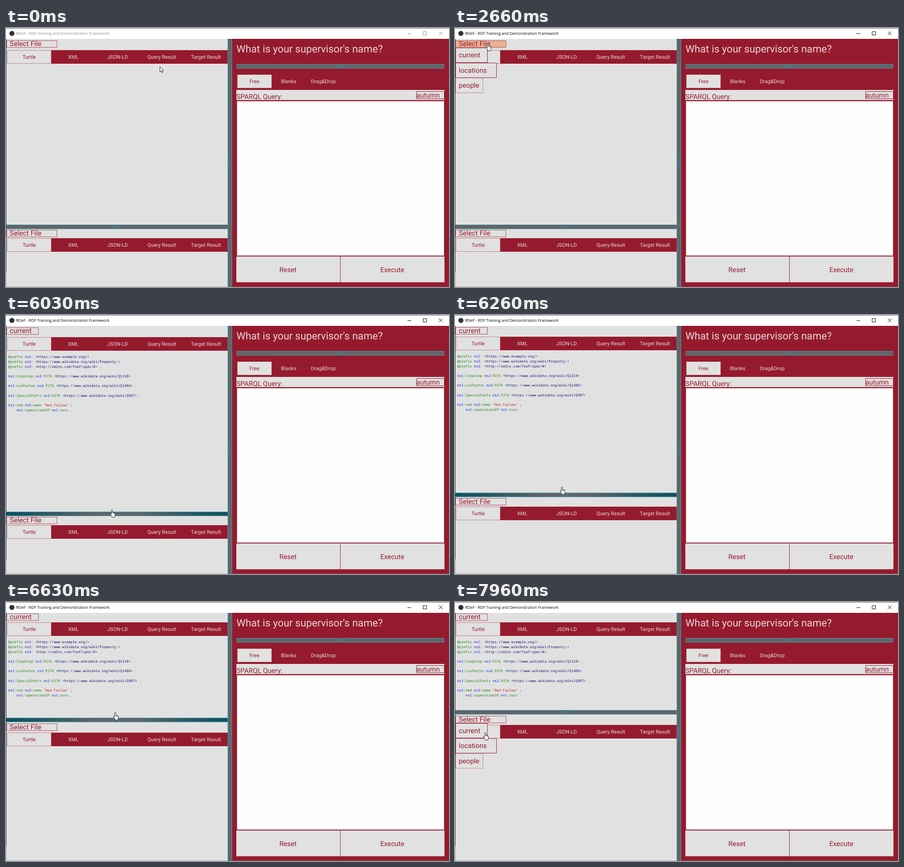
These frames come from a looping animation (977 px wide and 573 px high, 8 s). An HTML page:

```html
<!DOCTYPE html>
<html lang="en">
<head>
<meta charset="utf-8">
<title>RDeF</title>
<style>
html, body { margin: 0; width: 100%; height: 100%; overflow: hidden; background: #fff; }
svg { display: block; width: 977px; height: 573px; }
text { font-family: Roboto, sans-serif; text-rendering: geometricPrecision; white-space: pre; }
.bar { font-family: "Open Sans", sans-serif; }
.code { font-family: "Noto Sans Mono", "DejaVu Sans Mono", monospace; }
</style>
</head>
<body>
<svg id="stage" viewBox="0 0 977 573" xmlns="http://www.w3.org/2000/svg">
  <defs>
    <linearGradient id="teal">
      <stop offset="0" stop-color="#0d525b"/><stop offset=".1" stop-color="#1c555c"/>
      <stop offset=".4" stop-color="#636464"/><stop offset=".6" stop-color="#636464"/>
      <stop offset=".9" stop-color="#1c555c"/><stop offset="1" stop-color="#0d525b"/>
    </linearGradient>
  </defs>
</svg>
<script>
const LOOP = 8000;
const RED = '#961a2d', GRAY = '#e1e1e1', PEACH = '#ebb292', PALE = '#e4d8da';
const STEEL = '#636464', BLUE = '#3b93b1';
const TABS = ['Turtle', 'XML', 'JSON-LD', 'Query Result', 'Target Result'];
const CODE = `@prefix ns1: <https://www.example.org/> .
@prefix ns2: <https://www.wikidata.org/wiki/Property:> .
@prefix ns3: <http://xmlns.com/foaf/spec/#> .

ns1:CorpCorp ns2:P276 <https://www.wikidata.org/wiki/Q1218> .

ns1:LosPartos ns2:P276 <https://www.wikidata.org/wiki/Q1486> .

ns1:SpecialParts ns2:P276 <https://www.wikidata.org/wiki/Q987> .

ns1:ned ns3:name "Ned Farlow" ;
    ns1:superviserOf ns1:ross .`;

const stage = document.getElementById('stage');

function el(parent, tag, attrs = {}, text) {
  const node = document.createElementNS('http://www.w3.org/2000/svg', tag);
  set(node, attrs);
  if (text !== undefined) node.textContent = text;
  return parent.appendChild(node);
}
function set(node, attrs) {
  for (const k in attrs) node.setAttribute(k, attrs[k]);
}
const rect = (p, x, y, width, height, fill, more) =>
  el(p, 'rect', { x, y, width, height, fill, ...more });
const frame = (p, x, y, w, h, fill, stroke = RED) =>
  rect(p, x + .5, y + .5, w - 1, h - 1, fill, { stroke, 'stroke-width': 1 });
const label = (p, x, y, size, fill, str, anchor = 'start') =>
  el(p, 'text', { x, y, fill, 'font-size': size, 'text-anchor': anchor }, str);
const path = (p, d, more) => el(p, 'path', { d, fill: 'none', ...more });
const group = p => el(p, 'g');
const move = (node, x, y) => node.setAttribute('transform', `translate(${x} ${y})`);
const show = (node, on) => node.setAttribute('visibility', on ? 'visible' : 'hidden');

// Splitter bar lying along x, with grip marks in the middle
function splitter(p, w, grip = w / 2) {
  const g = group(p);
  const body = rect(g, 0, 0, w, 9.5, STEEL);
  rect(g, 0, 0, w, 1.2, BLUE);
  rect(g, 0, 8.6, w, 1.2, BLUE);
  for (let i = 0; i < 6; i++)
    rect(g, grip - 9 + i * 3.4, 2, 1, 6, i % 2 ? '#4a7f90' : BLUE);
  return { g, body };
}

function panel(p) {
  const g = group(p);
  const head = group(g), tabs = group(g);
  const box = frame(head, 1, 0, 112, 16, GRAY, '#b04757');
  const name = label(head, 8.3, 12.8, 15.3, RED, 'Select File');
  rect(tabs, 1, 0, 488, 30, GRAY);
  rect(tabs, 99.5, 0, 389.5, 30, RED);
  frame(tabs, 2, 0, 98, 30, GRAY, '#c2808a');
  TABS.forEach((s, i) => label(tabs, 51 + i * 97.5, 18.9, 11.3, i ? PALE : RED, s, 'middle'));
  return { head, tabs, box, name };
}

function menu(p) {
  const g = group(p);
  const items = [['current', 71], ['locations', 91], ['people', 61]].map(([s, w], i) => {
    const r = frame(g, 1, i * 33.4, w, 33.4, GRAY, i < 2 ? RED : '#c2808a');
    label(g, 8.3, i * 33.4 + 21.7, 15.1, RED, s);
    return r;
  });
  return { g, first: items[0] };
}

function codeBlock(p) {
  const g = group(p);
  const hue = (s, next) =>
    s[0] === '@' ? '#1c8a1c' : s[0] === '<' ? '#14147c' : s[0] === '"' ? '#c02a2a' :
    /\w/.test(s) ? (next === ':' ? '#1414e6' : '#128a12') : '#333';
  CODE.split('\n').forEach((line, i) => {
    const t = el(g, 'text', { x: 5, y: 46.2 + i * 10.69, 'font-size': 7.63, class: 'code' });
    for (const m of line.matchAll(/@\w+|<[^>]*>|"[^"]*"|\w+|\s+|./g))
      el(t, 'tspan', { fill: hue(m[0], line[m.index + m[0].length]) }, m[0]);
  });
  return g;
}

// Title bar
rect(stage, 0, 0, 977, 24, '#fff');
rect(stage, 0, 0, 977, 1, '#6a6a6a');
el(stage, 'circle', { cx: 13, cy: 12, r: 5.6, fill: '#333' });
const title = label(stage, 22.3, 15.2, 8.6, '#000', 'RDeF - RDF Training and Demonstration Framework');
title.setAttribute('class', 'bar');
const controls = path(stage, 'M885.5 12.5h8M920 8h7.5v7.5h-7.5zM954.5 7.8l8 8m0-8l-8 8', { 'stroke-width': 1 });

// Left side
rect(stage, 0, 24, 489, 549, GRAY);
const top_ = panel(stage), low = panel(stage);
const code = codeBlock(stage);
const bar = splitter(stage, 489, 244);
const topMenu = menu(stage), lowMenu = menu(stage);
rect(stage, 0, 24, 1, 516, '#2b3550');
rect(stage, 0, 540, 1, 33, '#a8a8a8');

// Right side
rect(stage, 498, 24, 479, 549, RED);
const upright = splitter(stage, 549, 275);
upright.g.setAttribute('transform', 'translate(498.6 24) rotate(90)');
label(stage, 508.2, 54.3, 22.6, PALE, "What is your supervisor's name?");
move(splitter(stage, 459, 229).g, 508, 79.8);
frame(stage, 510, 103, 76, 30, GRAY, '#c9a0a6');
label(stage, 547.8, 122.1, 11.3, RED, 'Free', 'middle');
label(stage, 623.4, 122.1, 11.3, PALE, 'Blanks', 'middle');
label(stage, 699.8, 122.1, 11.3, PALE, 'Drag&Drop', 'middle');
rect(stage, 508, 137, 459, 22.5, GRAY);
label(stage, 508, 157.3, 15.1, RED, 'SPARQL Query:');
frame(stage, 905, 140, 62, 17, GRAY);
label(stage, 905.3, 153.5, 15.1, RED, 'autumn');
rect(stage, 509.5, 162, 456.5, 341.5, '#fefefe');
rect(stage, 508, 505.5, 229, 57, GRAY);
rect(stage, 738, 505.5, 229, 57, GRAY);
label(stage, 622, 539.7, 15.1, RED, 'Reset', 'middle');
label(stage, 852, 539.7, 15.1, RED, 'Execute', 'middle');
rect(stage, 0, 572, 977, 1, '#777', { opacity: .5 });

// Pointers
const arrow = path(stage, 'M.5 .5v12l2.8-2.6 1.9 4 1.8-.8-1.8-3.9h3.6z',
  { fill: '#fff', stroke: '#111', 'stroke-width': .9, 'stroke-linejoin': 'round' });
const hand = group(stage);
path(hand, 'M3.4 10.8V2.1q0-1.5 1.3-1.5t1.3 1.5v4.5q1.2-.8 2 .4 1.3-.6 1.9.6 1.7-.3 1.7 1.4v3.2q0 1.8-1.1 3.2v2H4.6v-1.7L1 11.2q-.9-1.4.1-1.9.9-.4 2.3 1.5z',
  { fill: '#fff', stroke: '#111', 'stroke-width': .9, 'stroke-linejoin': 'round' });
path(hand, 'M6 6.6v3M8 7v2.6M9.9 7.6v2.2', { stroke: '#111', 'stroke-width': .7 });

// Keys: time, values; a trailing 'l' makes the segment towards it linear
const POINTER = [
  [0, 339, 85], [230, 339, 85], [830, 68, 33], [1930, 68, 33], [2150, 60, 92], [2360, 68, 33],
  [3160, 68, 33], [3660, 49, 58], [4860, 49, 58], [5460, 224, 441], [5630, 224, 441],
  [5800, 229, 430], [6060, 229, 430], [6200, 230, 405, 'l'], [6400, 233, 322, 'l'],
  [6500, 234, 269, 'l'], [6600, 236, 245, 'l'], [6830, 237, 236, 'l'], [7000, 237, 236],
  [7060, 121, 251, 'l'], [7180, 84, 255, 'l'], [7350, 66, 257, 'l'], [7830, 66, 257], [7960, 62, 288]
];
const SPLIT = [
  [0, 435], [6060, 435], [6220, 408, 'l'], [6430, 330, 'l'], [6500, 295, 'l'],
  [6620, 257, 'l'], [6740, 243, 'l'], [6830, 239, 'l']
];

function track(keys, t, n) {
  const i = keys.findIndex(k => k[0] > t);
  if (i < 0) return keys[keys.length - 1].slice(1, n + 1);
  const a = keys[i - 1], b = keys[i];
  let u = (t - a[0]) / (b[0] - a[0]);
  if (b[n + 1] !== 'l') u = u * u * (3 - 2 * u);
  return a.slice(1, n + 1).map((v, j) => v + (b[j + 1] - v) * u);
}
const within = (t, a, b) => t >= a && t < b;

function draw(t) {
  const [s] = track(SPLIT, t, 1);
  const y = Math.round(s);
  const headTop = Math.round(16.4 + .021 * (y - 24));
  const headLow = Math.round(18.6 + .018 * (564 - y));
  const boxTop = 24 + headTop / 2 - 9, boxLow = y + 9 + headLow / 2 - 8;
  const loaded = t >= 4560, active = t >= 1160;

  move(top_.head, 0, boxTop);
  move(top_.tabs, 0, 24 + headTop);
  move(code, 0, 24 + headTop);
  move(low.head, 0, boxLow);
  move(low.tabs, 0, y + 9 + headLow);
  move(bar.g, 0, y);
  move(topMenu.g, 0, boxTop + 16);
  move(lowMenu.g, 0, boxLow + 16);

  top_.name.textContent = loaded ? 'current' : 'Select File';
  set(top_.box, { width: loaded ? 70 : 111, fill: within(t, 2560, 3160) ? PEACH : GRAY });
  low.box.setAttribute('fill', within(t, 7430, 7830) ? PEACH : GRAY);
  topMenu.first.setAttribute('fill', within(t, 3640, 4560) ? PEACH : GRAY);
  bar.body.setAttribute('fill', within(t, 5850, 7000) ? 'url(#teal)' : STEEL);
  show(code, loaded);
  show(topMenu.g, within(t, 2660, 4560));
  show(lowMenu.g, t >= 7530);
  title.setAttribute('fill', active ? '#000' : '#8c8c8c');
  controls.setAttribute('stroke', active ? '#000' : '#8c8c8c');

  const [px, py] = track(POINTER, t, 2);
  const onButton = t >= 730;
  show(arrow, !onButton);
  show(hand, onButton);
  move(onButton ? hand : arrow, px, py);
}

const start = performance.now();
function tick() {
  draw((performance.now() - start) % LOOP);
  requestAnimationFrame(tick);
}
tick();
</script>
</body>
</html>
```
